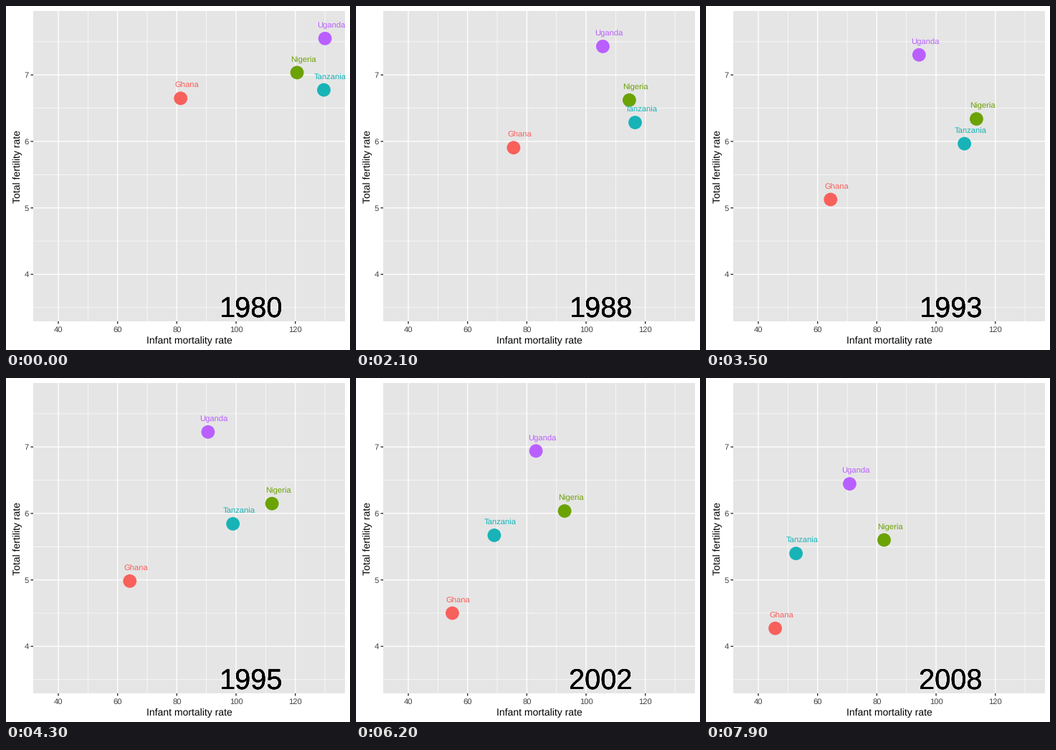
A matplotlib script for the animation above (8000 ms loop, 480 by 480 pixels).

```python
import numpy as np
import matplotlib.pyplot as plt
from matplotlib.animation import FuncAnimation
from matplotlib.patches import Circle, Rectangle

SIZE, DPI = 480, 100
FRAMES, INTERVAL = 80, 100
PT = 72 / DPI                          # points per pixel
YEARS_PER_FRAME = 0.36
LEFT, TOP, RIGHT, BOTTOM = 38, 7, 473, 440
CAP = 0.358                            # half the cap height, in em

plt.rcParams["font.family"] = "Liberation Sans"
plt.rcParams["text.hinting"] = "none"

KEY_FRAMES = np.array([0, 12, 21, 35, 51, 62, 79])
# name: colour, x path, y path (stage pixels at the key frames)
COUNTRIES = {
    "Ghana": ("#F8605B",
              [243.7, 236.7, 219.9, 173.8, 171.7, 134.4, 96.6],
              [128.8, 145.5, 197.7, 270.0, 295.3, 328.1, 349.3]),
    "Nigeria": ("#6BA204",
                [406.1, 391.7, 381.4, 377.4, 358.9, 291.1, 248.5],
                [92.9, 114.3, 131.3, 157.6, 185.6, 185.6, 226.0]),
    "Tanzania": ("#17B3B7",
                 [443.5, 412.1, 389.5, 360.6, 260.4, 192.9, 125.6],
                 [117.1, 142.8, 162.6, 192.1, 212.1, 219.5, 244.8]),
    "Uganda": ("#B95FFF",
               [445.1, 434.5, 344.4, 297.3, 269.0, 251.1, 200.4],
               [45.3, 48.3, 56.4, 68.2, 83.7, 101.8, 147.7]),
}


def px(v):
    return 73.0 + (v - 40) * 4.134


def py(v):
    return 96.2 + (7 - v) * 92.75


def smooth_path(values):
    """Monotone cubic through the key frames, sampled at every frame."""
    v = np.array(values)
    h = np.diff(KEY_FRAMES)
    d = np.diff(v) / h
    a, b = d[:-1], d[1:]
    same = a * b > 0
    inner = np.where(same, 2 * a * b / np.where(same, a + b, 1), 0)
    m = np.concatenate([[d[0]], inner, [d[-1]]])
    n = np.arange(FRAMES)
    i = np.clip(np.searchsorted(KEY_FRAMES, n, side="right") - 1, 0, len(h) - 1)
    t = (n - KEY_FRAMES[i]) / h[i]
    u = 1 - t
    return (v[i] * (1 + 2 * t) * u**2 + v[i + 1] * t**2 * (3 - 2 * t)
            + h[i] * (m[i] * t * u**2 - m[i + 1] * t**2 * u))


fig = plt.figure(figsize=(SIZE / DPI, SIZE / DPI), dpi=DPI, facecolor="white")
ax = fig.add_axes([0, 0, 1, 1])
ax.set_xlim(0, SIZE)
ax.set_ylim(SIZE, 0)
ax.axis("off")


def line(xs, ys, color, width, z):
    ax.plot(xs, ys, color=color, lw=width * PT, zorder=z,
            solid_capstyle="butt", snap=False)


def label(x, y, text, size, color="black", **kw):
    kw = {"ha": "center", "va": "baseline", "zorder": 6, **kw}
    return ax.text(x, y, text, fontsize=size * PT, color=color, **kw)


panel = Rectangle((LEFT, TOP), RIGHT - LEFT, BOTTOM - TOP,
                  facecolor="#E5E5E5", lw=0, zorder=0)
ax.add_patch(panel)

for v in range(50, 131, 20):
    line([px(v)] * 2, [TOP, BOTTOM], "white", 0.68, 1)
for v in np.arange(3.5, 8):
    line([LEFT, RIGHT], [py(v)] * 2, "white", 0.68, 1)
for v in range(40, 121, 20):
    line([px(v)] * 2, [TOP, BOTTOM], "white", 1.36, 2)
    line([px(v)] * 2, [BOTTOM, BOTTOM + 3.5], "#292929", 1.36, 2)
    label(px(v), 455, str(v), 11.2, "#404040")
for v in range(4, 8):
    line([LEFT, RIGHT], [py(v)] * 2, "white", 1.36, 2)
    line([LEFT - 3.5, LEFT], [py(v)] * 2, "#292929", 1.36, 2)
    label(31.7, py(v) + 11.2 * CAP, str(v), 11.2, "#404040", ha="right")

label(255.5, 471, "Infant mortality rate", 14)
label(20, 224, "Total fertility rate", 14, rotation=90, rotation_mode="anchor")

movers = []
for name, (color, xs, ys) in COUNTRIES.items():
    dot = Circle((0, 0), 9.4, facecolor=color, lw=0, zorder=4)
    ax.add_patch(dot)
    tag = label(0, 0, name, 11.2, color, zorder=5)
    tag.set_clip_path(panel)
    movers.append((dot, tag, smooth_path(xs), smooth_path(ys)))

# The year is stacked once per country, which hardens its edges.
years = [label(px(105), py(3.5) + 39.8 * CAP, "", 39.8) for _ in COUNTRIES]


def update(n):
    for dot, tag, xs, ys in movers:
        dot.center = xs[n], ys[n]
        tag.set_position((xs[n] + 8.3, ys[n] - 18.55 + 11.2 * CAP))
    for text in years:
        text.set_text(str(round(1980 + n * YEARS_PER_FRAME)))
    return [m for pair in movers for m in pair[:2]] + years


anim = FuncAnimation(fig, update, frames=FRAMES, interval=INTERVAL,
                     repeat=True, repeat_delay=0, blit=False)
plt.show()
```
